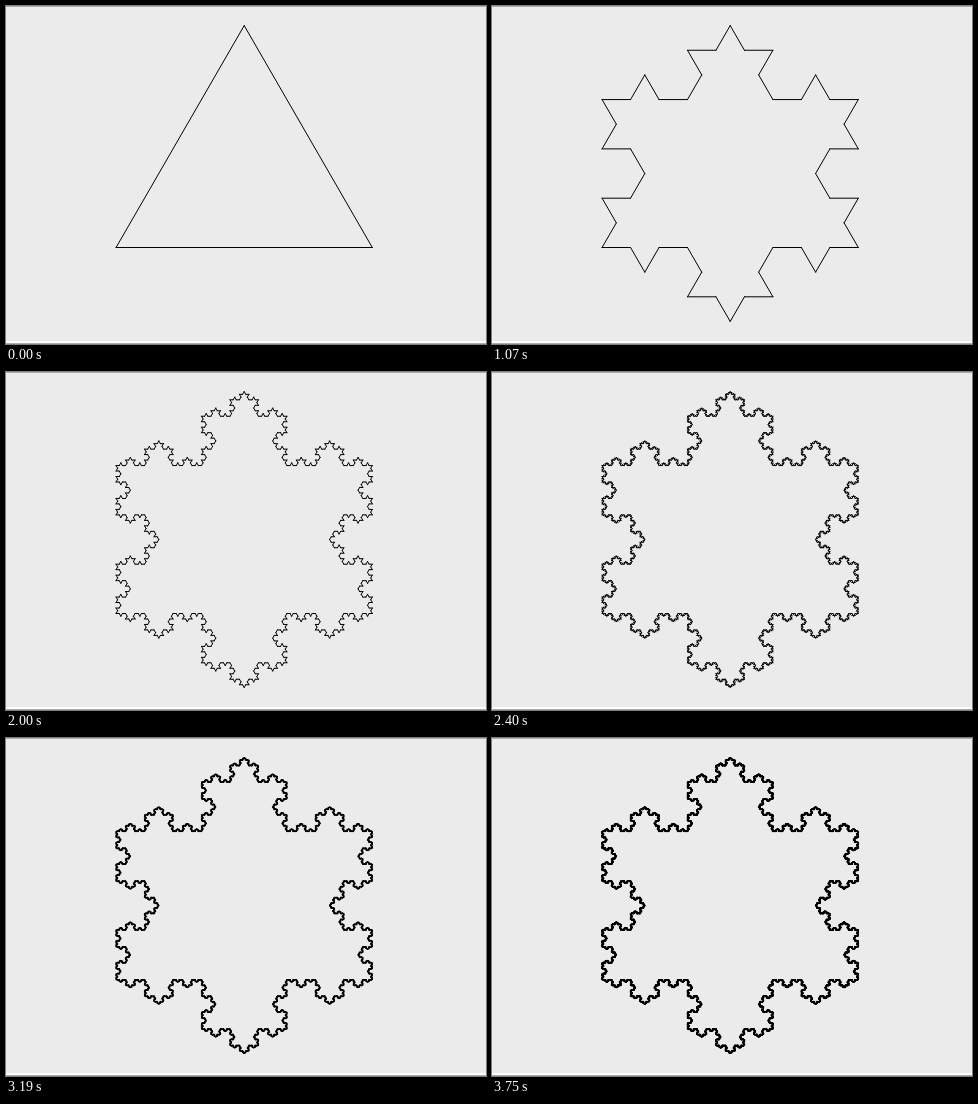
Animation, 480 px wide and 338 px high, one loop 3.99 s. Source, as an HTML page with a canvas:

```html
<!DOCTYPE html>
<html lang="en">
<head>
<meta charset="utf-8">
<title>Koch snowflake</title>
<style>
  html, body { margin: 0; width: 100%; height: 100%; overflow: hidden; background: #ebebeb; }
  canvas { display: block; }
</style>
</head>
<body>
<canvas id="stage" width="480" height="338"></canvas>
<script>
const W = 480, H = 338, LOOP = 3990;
const steps = [
  { at: 0, depth: 0 },
  { at: 1070, depth: 2 },
  { at: 1530, depth: 3 },
  { at: 2000, depth: 4 },
  { at: 2400, depth: 5 },
  { at: 2870, depth: 6 },
  { at: 3400, depth: 7 }
];
const midX = 238.2, apexY = 19.6, baseY = 241.5;
const half = (baseY - apexY) / Math.sqrt(3);
const sin60 = Math.sqrt(3) / 2;

function bar(g, y, h, color) {
  g.fillStyle = color;
  g.fillRect(0, y, W, h);
}

// Each piece is stroked by itself, so short pieces build up a darker line.
function edge(g, x1, y1, x2, y2, depth) {
  if (depth === 0) {
    g.beginPath();
    g.moveTo(x1, y1);
    g.lineTo(x2, y2);
    g.stroke();
    return;
  }
  const dx = (x2 - x1) / 3, dy = (y2 - y1) / 3;
  const ax = x1 + dx, ay = y1 + dy;
  const bx = x2 - dx, by = y2 - dy;
  const px = ax + dx / 2 + dy * sin60;
  const py = ay + dy / 2 - dx * sin60;
  edge(g, x1, y1, ax, ay, depth - 1);
  edge(g, ax, ay, px, py, depth - 1);
  edge(g, px, py, bx, by, depth - 1);
  edge(g, bx, by, x2, y2, depth - 1);
}

function render(depth) {
  const layer = document.createElement('canvas');
  layer.width = W;
  layer.height = H;
  const g = layer.getContext('2d', { willReadFrequently: true });
  bar(g, 0, H, '#ebebeb');
  bar(g, 0, 1, '#aaaaaa');
  bar(g, 335, 2, '#fcfcfc');
  bar(g, 337, 1, '#aaaaaa');
  g.strokeStyle = '#000';
  g.lineWidth = 1;
  g.lineCap = 'round';
  const x1 = midX - half, x2 = midX + half;
  edge(g, x1, baseY, midX, apexY, depth);
  edge(g, midX, apexY, x2, baseY, depth);
  edge(g, x2, baseY, x1, baseY, depth);
  return layer;
}

const layers = steps.map(s => render(s.depth));
const ctx = document.getElementById('stage').getContext('2d');
const start = performance.now();
let shown = -1;

function draw(now) {
  const t = Math.max(0, now - start) % LOOP;
  let i = steps.length - 1;
  while (steps[i].at > t) i--;
  if (i !== shown) {
    ctx.drawImage(layers[i], 0, 0);
    shown = i;
  }
  requestAnimationFrame(draw);
}
draw(start);
</script>
</body>
</html>
```
